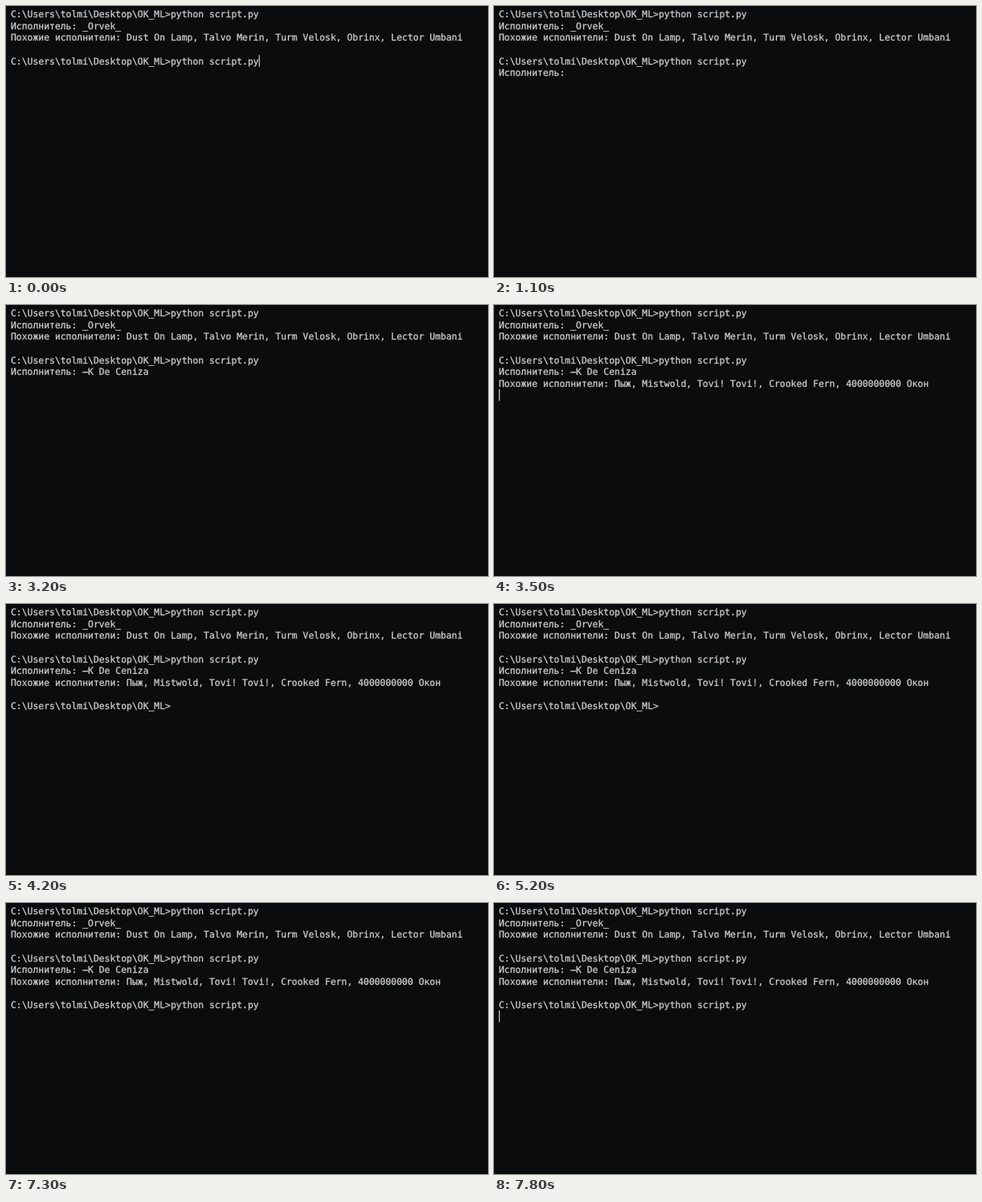
Animation, 600 px wide and 338 px high, one loop 8 s. Source, as an HTML page with a canvas:

```html
<!DOCTYPE html>
<html lang="ru">
<head>
<meta charset="utf-8">
<title>Terminal</title>
<style>
  html, body { margin: 0; width: 100%; height: 100%; overflow: hidden; background: #0b0c0e; }
  canvas { display: block; width: 100vw; height: 100vh; }
</style>
</head>
<body>
<canvas id="screen" width="600" height="338"></canvas>
<script>
const ctx = document.getElementById('screen').getContext('2d');
const LOOP = 8000;
const LEFT = 6, TOP = 3, CELL_W = 6.86, CELL_H = 14.56, BASELINE = 11.3;
const BACK = '#0b0c0e', INK = '#cccccc';

const PROMPT = 'C:\\Users\\tolmi\\Desktop\\OK_ML>';
const COMMAND = 'python script.py';
const ASK = 'Исполнитель: ';
const ANSWER = 'Похожие исполнители: ';
const ARTIST = '–K De Ceniza';

// Text pieces: start time, row, column, text
const pieces = [
  [0, 0, 0, PROMPT + COMMAND],
  [0, 1, 0, ASK + '_Orvek_'],
  [0, 2, 0, ANSWER + 'Dust On Lamp, Talvo Merin, Turm Velosk, Obrinx, Lector Umbani'],
  [0, 4, 0, PROMPT + COMMAND],
  [1100, 5, 0, ASK],
  [2500, 5, ASK.length, ARTIST],
  [3500, 6, 0, ANSWER + 'Пыж, Mistwold, Tovi! Tovi!, Crooked Fern, 4000000000 Окон'],
  [3600, 8, 0, PROMPT],
  [5500, 8, PROMPT.length, COMMAND]
];

// Cursor spans while it is lit: start, end, row, column
const lineEnd = PROMPT.length + COMMAND.length;
const cursor = [
  [0, 300, 4, lineEnd],
  [300, 1100, 5, 0],
  [1600, 2100, 5, ASK.length],
  [2300, 2500, 5, ASK.length],
  [2500, 3200, 5, ASK.length + ARTIST.length],
  [3500, 3600, 7, 0],
  [3600, 4200, 8, PROMPT.length],
  [4700, 5200, 8, PROMPT.length],
  [5500, 6300, 8, lineEnd],
  [6800, 7300, 8, lineEnd],
  [7700, 7800, 8, lineEnd],
  [7800, 8000, 9, 0]
];

const cellX = col => LEFT + col * CELL_W;
const cellY = row => TOP + row * CELL_H;

function write(row, col, text) {
  const y = cellY(row) + BASELINE;
  [...text].forEach((ch, i) => {
    const x = cellX(col + i);
    ctx.fillText(ch, x, y);
    ctx.strokeText(ch, x, y);
  });
}

function draw(t) {
  ctx.fillStyle = BACK;
  ctx.fillRect(0, 0, 600, 338);
  ctx.fillStyle = ctx.strokeStyle = INK;
  ctx.lineWidth = 0.3; // a touch heavier than the regular weight
  ctx.lineJoin = 'round';
  ctx.font = '11.4px "DejaVu Sans Mono", monospace';
  ctx.textRendering = 'geometricPrecision';
  for (const [start, row, col, text] of pieces) {
    if (t >= start) write(row, col, text);
  }
  for (const [start, end, row, col] of cursor) {
    if (t >= start && t < end) ctx.fillRect(cellX(col), cellY(row), 1.2, 14.5);
  }
}

const begin = performance.now();
function tick() {
  draw((performance.now() - begin) % LOOP);
  requestAnimationFrame(tick);
}
tick();
</script>
</body>
</html>
```
